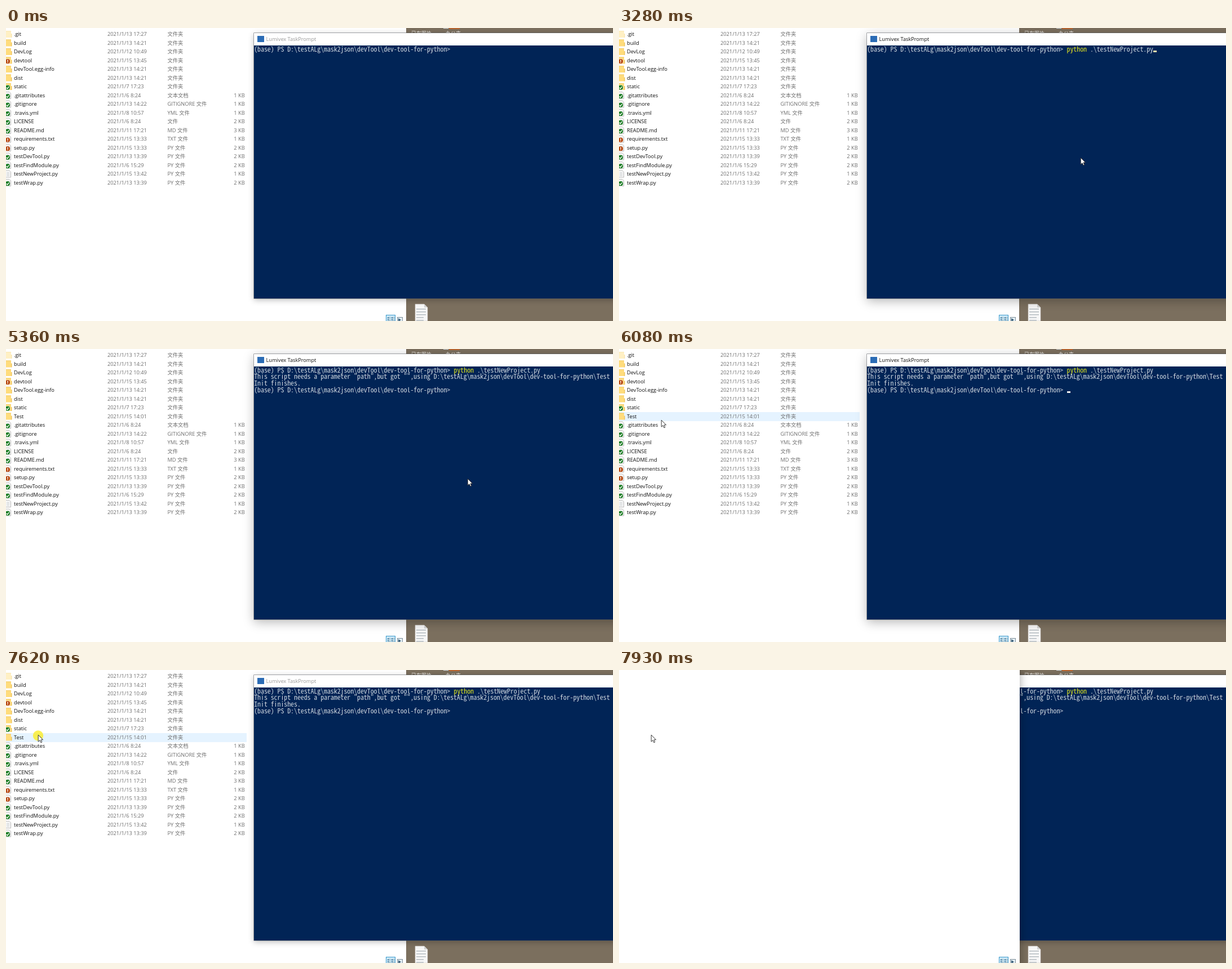
Write an HTML page with a canvas that moves like this. It is 1077 by 520 pixels and loops after 8000 ms.

```html
<!DOCTYPE html>
<html lang="zh-CN">
<head>
<meta charset="utf-8">
<title>Terminal and file list</title>
<style>
html, body { margin: 0; width: 100%; height: 100%; overflow: hidden; background: #7b6f5e; }
canvas { display: block; }
</style>
</head>
<body>
<canvas id="stage" width="1077" height="520"></canvas>
<script>
const ctx = document.getElementById('stage').getContext('2d');
const LOOP = 8000, STEP = 78, BLINK = 530;
const UI = '"Open Sans", "Noto Sans CJK SC", "Noto Sans CJK", sans-serif';
const MONO = '"Noto Sans Mono CJK SC", "Liberation Mono", monospace';
const CELL = 5.906, LINE = 11.8, TERM_X = 440.2;
const ROW = 15.5;

// Moments of the story
const FOCUS = 550, ENTER = 3660, OUTPUT = 4440, DONE = 4520, CLICK = 7620, RAISE = 7780, BLANK = 7860;

// Pick the size at which one monospace cell is CELL wide.
ctx.font = `100px ${MONO}`;
const monoFont = `${(100 * CELL / ctx.measureText('x').width).toFixed(3)}px ${MONO}`;

const PATH = 'D:\\testALg\\mask2json\\devTool\\dev-tool-for-python';
const PROMPT = `(base) PS ${PATH}>`;
const COMMAND = 'python .\\testNewProject.py';

// name | day and time | type | size | badge
const FILES = `
.git|13 17:27|文件夹
build|13 14:21|文件夹
DevLog|12 10:49|文件夹
devtool|15 13:45|文件夹||bad
DevTool.egg-info|13 14:21|文件夹
dist|13 14:21|文件夹
static|7 17:23|文件夹||ok
Test|15 14:01|文件夹
.gitattributes|6 8:24|文本文档|1|ok
.gitignore|13 14:22|GITIGNORE 文件|1|ok
.travis.yml|8 10:57|YML 文件|1|ok
LICENSE|6 8:24|文件|2|ok
README.md|11 17:21|MD 文件|3|ok
requirements.txt|15 13:33|TXT 文件|1|bad
setup.py|15 13:33|PY 文件|2|bad
testDevTool.py|13 13:39|PY 文件|2|ok
testFindModule.py|6 15:29|PY 文件|2|ok
testNewProject.py|15 13:42|PY 文件|1
testWrap.py|13 13:39|PY 文件|2|ok`.trim().split('\n').map(s => s.split('|'));

// Pointer trips, each starting where the one before ended
const TRIPS = [
  { from: 70, to: 470, x: 819, y: 230 },
  { from: 5760, to: 6080, x: 75, y: 126 },
  { from: 6100, to: 6470, x: 71, y: 90 },
  { from: 6870, to: 6930, x: 67, y: 98 },
  { from: 7160, to: 7470, x: 57, y: 115 }
];
const BLINK_STARTS = [1180, 1650, 2640, 3280, 4830];

const within = (t, a, b) => t >= a && t < b;
const lerp = (a, b, p) => a + (b - a) * p;

function pointerAt(t) {
  if (t < TRIPS[0].from) return null;
  let pos = { x: 1010, y: 475 };
  for (const { from, to, x, y } of TRIPS) {
    if (t < from) break;
    const steps = Math.max(1, Math.round((to - from) / STEP));
    const p = Math.min(1, (Math.floor((t - from) / STEP) + 1) / (steps + 1));
    const ease = t >= to ? 1 : 1 - (1 - p) ** 2;
    pos = { x: lerp(pos.x, x, ease), y: lerp(pos.y, y, ease) };
  }
  return pos;
}

function caretOn(t) {
  const start = BLINK_STARTS.filter(s => s <= t).pop();
  return start !== undefined && Math.floor((t - start) / BLINK) % 2 === 0;
}

const typedAt = t => t < 1720 ? 0 : t < 2640 ? 5 : t < 2730 ? 11 : COMMAND.length;

function rect(x, y, w, h, color) {
  ctx.fillStyle = color;
  ctx.fillRect(x, y, w, h);
}

function text(s, x, y, color, font, align = 'left') {
  ctx.font = font;
  ctx.textAlign = align;
  ctx.fillStyle = color;
  ctx.fillText(s, x, y);
}

function poly(points, fill, stroke, width = 1) {
  ctx.beginPath();
  points.forEach(([x, y], i) => i ? ctx.lineTo(x, y) : ctx.moveTo(x, y));
  if (fill) { ctx.closePath(); ctx.fillStyle = fill; ctx.fill(); }
  if (stroke) { ctx.strokeStyle = stroke; ctx.lineWidth = width; ctx.stroke(); }
}

function disc(x, y, r, color) {
  ctx.beginPath();
  ctx.arc(x, y, r, 0, 7);
  ctx.fillStyle = color;
  ctx.fill();
}

function shadowRect(x, y, w, h, color, blur, dy, alpha) {
  ctx.save();
  ctx.shadowColor = `rgba(0,0,0,${alpha})`;
  ctx.shadowBlur = blur;
  ctx.shadowOffsetY = dy;
  rect(x, y, w, h, color);
  ctx.restore();
}

function desktop() {
  rect(0, 0, 1077, 520, '#7b6f5e');
  text('已有图片', 719, 12.5, '#fff', `9px ${UI}`);
  text('办公夹', 780, 12.5, '#fff', `9px ${UI}`);
  rect(776, 0, 9, 1, '#d7dde2');
  rect(786, 0, 19, 2, '#b9652f');
  poly([[726, 490], [742, 490], [748, 496], [748, 520], [726, 520]], '#f7f7f7', '#c9c5be', 0.6);
  poly([[742, 490], [742, 496], [748, 496]], '#d2d2d2');
  for (let y = 498; y < 520; y += 5) rect(728, y, y > 510 ? 13 : 17, 1.6, '#b9c0c5');
}

function badge(kind, y) {
  disc(3, y, 4.6, '#fff');
  disc(3, y, 4.1, kind === 'ok' ? '#1d7d25' : '#b7470f');
  if (kind === 'ok') poly([[0.6, y], [2.4, y + 2], [5.4, y - 1.8]], null, '#fff', 1.3);
  else {
    rect(2.3, y - 2.7, 1.4, 3.3, '#fff');
    rect(2.3, y + 1.4, 1.4, 1.3, '#fff');
  }
}

function fileIcon([name, , type, , mark], y) {
  if (type === '文件夹') {
    const pale = name === '.git';
    rect(0, y - 6, 9, 12, pale ? '#fff0c4' : '#ffdc7c');
    rect(9, y - 1, 1.5, 7, pale ? '#f7e5b0' : '#efc55c');
    rect(0, y - 6, 9, 1, pale ? '#f9e7b5' : '#f2cb68');
  } else {
    poly([[-2, y - 6], [6, y - 6], [8.5, y - 3.5], [8.5, y + 6], [-2, y + 6]], '#fbfbfb', '#a9a9a9', 0.8);
    for (let k = -3; k < 5; k += 2) rect(1, y + k, 5.5, 0.8, '#c3c7ca');
  }
  if (mark) badge(mark, y + 1.7);
}

function fileList(t, tip) {
  const font = `9.25px ${UI}`;
  const files = FILES.filter(f => f[0] !== 'Test' || t >= DONE);
  const hover = tip && tip.x < 427 ? Math.floor((tip.y - 3.3) / ROW) : -1;
  files.forEach((file, i) => {
    const [name, date, type, size] = file;
    const y = 11 + ROW * i, base = y + 3.2;
    if (i === hover) rect(0, Math.round(y - 7.5), 427, 16, t >= RAISE ? '#cce8ff' : '#e5f3ff');
    fileIcon(file, y);
    text(name, 14, base, '#111', font);
    text('2021/1/' + date, 180, base, '#6d6d6d', font);
    text(type, 286.5, base, '#6d6d6d', font);
    if (size) text(size + ' KB', 423.7, base, '#6d6d6d', font, 'right');
  });
}

function viewButtons() {
  rect(674, 509, 17, 12, '#3a96c8');
  rect(675, 510, 15, 11, '#cdebfa');
  for (const x of [677, 684]) {
    for (let y = 513; y < 520; y += 3) {
      rect(x, y, 2, 2, '#44789a');
      rect(x + 2.5, y, 3, 1, '#6f8796');
    }
  }
  rect(694, 513, 10, 8, '#7d8c96');
  rect(695, 514, 8, 7, '#e4eff5');
  poly([[696, 515], [701, 518], [696, 521]], '#385e78');
}

function explorer(t, tip) {
  if (t >= RAISE) shadowRect(-30, -30, 741, 580, '#fff', 16, 0, 0.35);
  else rect(0, 0, 710, 520, '#fff');
  if (t < BLANK) fileList(t, tip);
  viewButtons();
}

function termLine(s, col, row, color = '#d3d8e0') {
  text(s, TERM_X + col * CELL, 41.5 + row * LINE, color, monoFont);
}

function caret(t) {
  if (!caretOn(t)) return;
  const [col, row] = t < ENTER ? [60 + typedAt(t), 0] : t < OUTPUT ? [0, 1] : t < DONE ? [0, 2] : [60, 3];
  rect(Math.round(TERM_X + col * CELL), Math.round(40 + row * LINE), 6, 3, row ? '#eee' : '#f4e3ae');
}

function terminal(t) {
  const active = within(t, FOCUS, CLICK);
  shadowRect(439.5, 8.5, 660, 472, '#55595f', active ? 18 : 10, active ? 4 : 2, active ? 0.28 : 0.25);
  rect(440, 9, 637, 22, '#fff');
  rect(440, 31, 637, 449, '#012456');
  rect(446, 14, 12, 11, '#2b6cb5');
  text('Lumivex TaskPrompt', 461.5, 23, active ? '#111' : '#999', `9.2px ${UI}`);

  const typed = typedAt(t);
  termLine(PROMPT, 0, 0);
  termLine(COMMAND.slice(0, Math.min(typed, 6)), 60, 0, '#e8e820');
  if (typed > 7) termLine(COMMAND.slice(7, typed), 67, 0);
  if (t >= OUTPUT) termLine(`This script needs a parameter "path",but got "",using ${PATH}\\Test`, 0, 1);
  if (t >= DONE) {
    termLine('Init finishes.', 0, 2);
    termLine(PROMPT, 0, 3);
  }
  caret(t);
}

function pointer(t, { x, y }) {
  if (within(t, FOCUS, FOCUS + 80) || within(t, CLICK, RAISE)) disc(x, y + 1.5, 9.2, 'rgba(250,236,40,.8)');
  const shape = [[0, 0], [0, 12], [2.8, 9.4], [4.7, 13.6], [6.6, 12.8], [4.8, 8.7], [8.4, 8.6], [0, 0]];
  poly(shape.map(([a, b]) => [x + 0.2 + a, y + 0.2 + b]), '#fff', '#222', 0.9);
}

function frame(now) {
  const t = now % LOOP;
  const tip = pointerAt(t);
  desktop();
  if (t < RAISE) { explorer(t, tip); terminal(t); }
  else { terminal(t); explorer(t, tip); }
  if (tip) pointer(t, tip);
}

let start = null;
function tick(now) {
  if (start === null) start = now;
  frame(now - start);
  requestAnimationFrame(tick);
}
frame(0);
requestAnimationFrame(tick);
</script>
</body>
</html>
```
